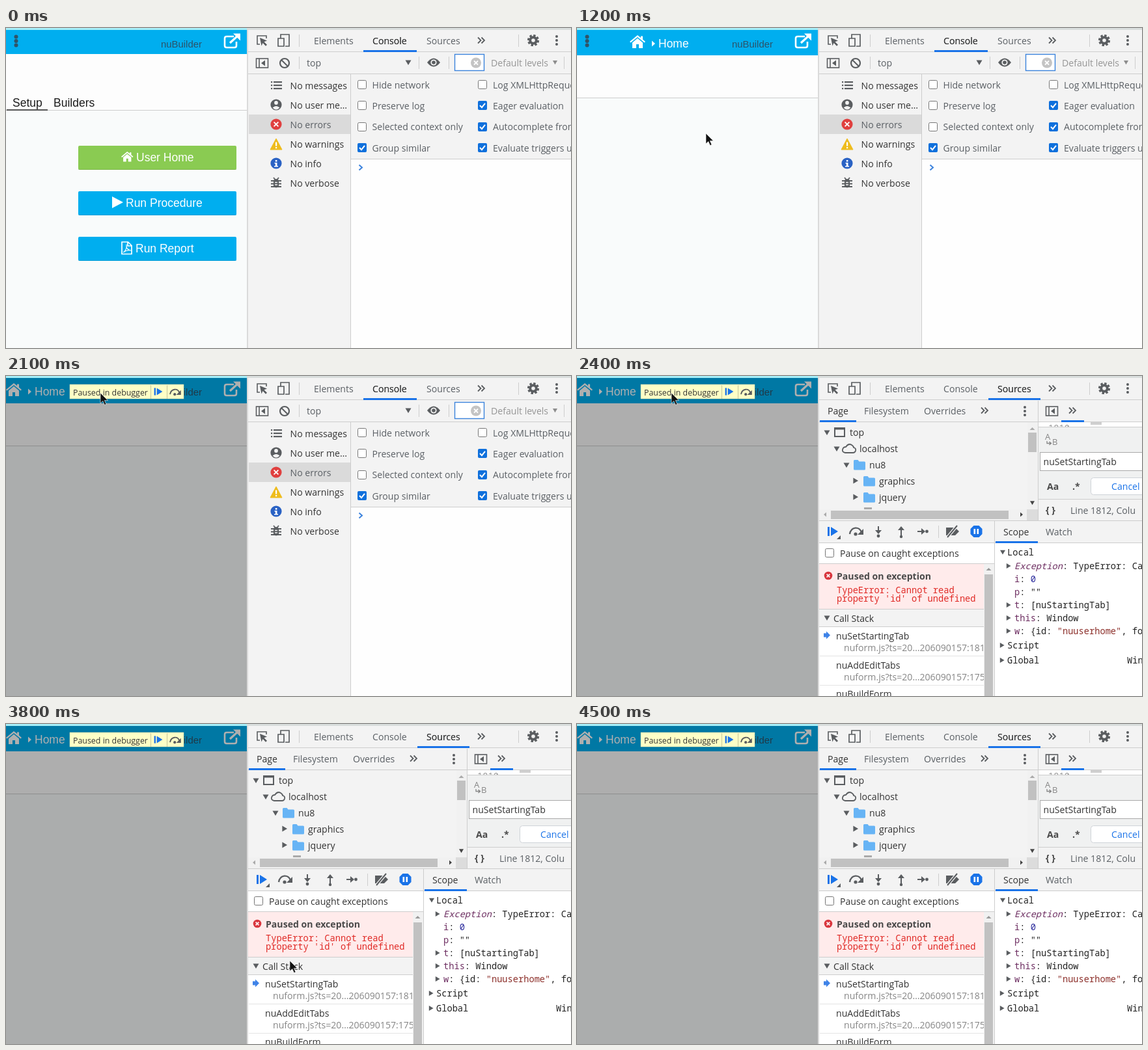
Write an HTML page that moves like this. It is 868 by 492 pixels and loops after 4.8 s.

```html
<!DOCTYPE html>
<html lang="en">
<head>
<meta charset="utf-8">
<title>Debugger walkthrough</title>
<style>
html, body { margin: 0; width: 100%; height: 100%; overflow: hidden; background: #fff; }
svg { display: block; width: 868px; height: 492px; }
text { font: 14.1px "Open Sans", sans-serif; fill: #333; white-space: pre; }
text.page { font: 17.5px "Liberation Sans", Arial, sans-serif; fill: #fff; }
text.tab { fill: #1c1c1c; }
text.app { font: 14.9px "Liberation Sans", Arial, sans-serif; fill: #2d5368; }
text.dim { fill: #5a5f64; }
text.mute { fill: #858585; }
text.bold { font-weight: 700; fill: #4a4a4a; }
text.tip { font-size: 12.4px; }
text.mono { font: 13.7px "Noto Sans Mono", monospace; fill: #222; }
text.err { fill: #e02a26; }
.key { fill: #6e2f62; }
.num { fill: #2a2a9c; }
.str { fill: #8c2f2a; }
</style>
</head>
<body>
<svg id="stage" viewBox="0 0 868 492" xmlns="http://www.w3.org/2000/svg"></svg>
<script>
const LOOP = 4800, STEP = 100;
const INK = '#5a5d60', BLUE = '#1a73e8', BAR = '#00aeef', PANEL = '#f3f3f3', LINE = '#cdcdcd';

const rect = (x, y, w, h, fill, more = '') =>
  `<rect x="${x}" y="${y}" width="${w}" height="${h}" fill="${fill}" ${more}/>`;
const text = (x, y, s, cls = '', more = '') => `<text x="${x}" y="${y}" class="${cls}" ${more}>${s}</text>`;
const path = (d, fill = INK, more = '') => `<path d="${d}" fill="${fill}" ${more}/>`;
const line = (d, color = INK, w = 2, more = '') =>
  `<path d="${d}" fill="none" stroke="${color}" stroke-width="${w}" ${more}/>`;
const dot = (x, y, r, fill = INK, more = '') => `<circle cx="${x}" cy="${y}" r="${r}" fill="${fill}" ${more}/>`;
const ring = (x, y, r, color, w, more = '') => dot(x, y, r, 'none', `stroke="${color}" stroke-width="${w}" ${more}`);
const at = (x, y, body, k = 1) => `<g transform="translate(${x} ${y}) scale(${k})">${body}</g>`;
const group = (id, body) => `<g id="${id}" display="none">${body}</g>`;
const hline = (x, y, w, c = LINE) => rect(x, y, w, 1, c);
const vline = (x, y, h, c = LINE) => rect(x, y, 1, h, c);

const kebab = (x, y, r = 2, gap = 6, c = INK) => [-1, 0, 1].map(i => dot(x, y + i * gap, r, c)).join('');
const more = (x, y) => line(`M${x - 5} ${y - 4.5}l4.5 4.5l-4.5 4.5M${x + 0.5} ${y - 4.5}l4.5 4.5l-4.5 4.5`, INK, 1.8);
const down = (x, y, r = 4.5, c = INK) => path(`M${x - r} ${y - r * .8}h${2 * r}l${-r} ${r * 1.7}z`, c);
const up = (x, y, r = 4, c = INK) => path(`M${x - r} ${y + r / 2}h${2 * r}l${-r} ${-r}z`, c);
const right = (x, y, r = 4.5, c = INK) => path(`M${x - r * .8} ${y - r}v${2 * r}l${r * 1.7} ${-r}z`, c);
const cross = (x, y, r, w) => line(`M${x - r} ${y - r}l${2 * r} ${2 * r}m0 ${-2 * r}l${-2 * r} ${2 * r}`, '#fff', w);
const house = (x, y, k = 1) => at(x, y, path(
  'M12 0L0 10l1.5 1.6L12 3l10.5 8.6L24 10l-4-3.4V1.5h-3v2.4zM12 4.8L4 11.5V20h6v-6h4v6h6v-8.5z', '#fff'), k);
const check = (x, y, on) => on
  ? rect(x, y, 14, 14, '#0f70dc', 'rx="2"') + line(`M${x + 3} ${y + 7}l3 3.2l5-6.4`, '#fff', 2)
  : rect(x + .5, y + .5, 13, 13, '#fff', 'rx="2" stroke="#767676"');
const resume = (x, y, k = 1) => at(x, y, rect(-8, -7, 3, 14, BLUE) + path('M-3-7v14l11-7z', BLUE), k);
const stepOver = (x, y, k = 1) => at(x, y,
  line('M-10 4C-8-8 5-8 8 1', INK, 2.4) + path('M11-4v9H2z') + dot(-1, 4, 2.6), k);

// Web page on the left
const exportIcon = line('M350 13h-11q-3 0-3 3v11q0 3 3 3h12q3 0 3-3v-6', '#fff', 2.6) +
  line('M344 23L357 11', '#fff', 3.2) + path('M349 8.5h11v11z', '#fff');
const bar = h => rect(0, 3, 370, h, BAR) + text(238, 30, 'nuBuilder', 'app') + exportIcon;
const crumb = x => house(x, 11) + path(`M${x + 34} 19.5v9l5-4.5z`, '#fff') + text(x + 44, 30, 'Home', 'page');
const button = (y, fill, x, label) =>
  rect(111, y, 243, 37, fill, 'rx="2"') + rect(111, y + 36, 243, 1, '#000', 'opacity=".1"') +
  text(x, y + 24, label, 'page');
const blank = top => rect(0, 0, 371, 492, '#fdfdfd') + rect(0, top, 370, 492 - top, '#f9fbfb') + hline(0, top, 370);
const dots = kebab(15.5, 20, 3, 6.6, '#2f5468');

const setup = group('setup', blank(126) + bar(37) + dots +
  text(10, 121, 'Setup', 'page tab') + text(73, 121, 'Builders', 'page tab') + rect(1, 125, 63, 2, '#555') +
  button(181, '#8acb52', 200, 'User Home') + house(177, 190, .77) +
  button(251, BAR, 184, 'Run Procedure') + path('M163 259v18l17-9z', '#fff') +
  button(321, BAR, 199, 'Run Report') +
  line('M178 329h9.5l5.5 5.5v13h-15zM187 329v6h6', '#fff', 1.7) +
  line('M180 345c4-2 6-8 5-11c-1 4 3 8 7 8c-4-1-8 0-12 3', '#fff', 1.2));

const home = group('home', blank(107) + bar(39) + dots + crumb(81));

const tooltip = rect(98, 13, 175, 22, '#ffffc6', 'stroke="#d6d6a6" stroke-width=".5"') +
  text(103, 30, 'Paused in debugger', 'tip') + vline(222, 14, 21, '#c5c59c') + vline(247, 14, 21, '#c5c59c') +
  resume(234, 24, .8) + stepOver(260, 25, .8);
const paused = group('paused', blank(107) + bar(39) + crumb(0) +
  rect(0, 3, 370, 489, '#000', 'opacity=".315"') + tooltip);

// Developer tools frame
const gear = ring(810, 19, 4.8, INK, 4) + ring(810, 19, 7.6, INK, 3, 'stroke-dasharray="3.4 2.57"');
const sideToggle = (x, y) => rect(x - 8.5, y - 7, 18, 14, 'none', `stroke="${INK}" stroke-width="1.6"`) +
  line(`M${x - 4} ${y - 7}v14`, INK, 1.6) + path(`M${x + 5} ${y - 4.5}v9l-6-4.5z`);
const tools = rect(371, 0, 497, 492, PANEL) + rect(370, 3, 2, 489, '#dadada') +
  rect(0, 0, 370, 3, '#a5eef8') + rect(370, 0, 498, 3, '#d9dddc') +
  line('M390 25h-4V12h14v4', INK, 1.6) + path('M390 15l11 4.5l-4.5 1.7l4.5 4.6l-2 2l-4.5-4.7l-2 4.3z') +
  line('M422 16V10h13v18h-6', INK, 1.7) + line('M418 16h9v12h-9z', INK, 1.7) +
  vline(450, 10, 19) + text(473, 25, 'Elements', 'dim') + text(563, 25, 'Console', 'dim') +
  text(646, 25, 'Sources', 'dim') + more(730, 19) + vline(787, 10, 19) + gear + kebab(846, 19) + hline(372, 36, 496);

// Console panel
const side = ['No messages', 'No user me…', 'No errors', 'No warnings', 'No info', 'No verbose'];
const bug = path('M411 234q4-4 8 0v9q-4 5-8 0z') +
  line('M407 235h16M407 239.500h16M407 244h16M411 230l2.500 3M419 230l-2.500 3', INK, 1.8) +
  line('M413 237.500h4M413 241h4', PANEL, 1.4);
const options = [['Hide network', 'Log XMLHttpRequests', 0, 0], ['Preserve log', 'Eager evaluation', 0, 1],
  ['Selected context only', 'Autocomplete from history', 0, 1],
  ['Group similar', 'Evaluate triggers user activation', 1, 1]];
const consolePane = group('console',
  rect(549, 34, 82, 3, BLUE) + text(563, 25, 'Console') +
  sideToggle(393, 54) + ring(428, 54, 7, INK, 2.2) + line('M423 49l10 10') + vline(450, 44, 19) +
  text(462, 59, 'top', 'dim') + down(618, 53) + vline(634, 44, 19) +
  path('M647 53q10-13 20 0q-10 13-20 0z') + dot(657, 53, 4.6, PANEL) + dot(657, 53, 2.8) +
  vline(680, 44, 19) + rect(689.5, 40.5, 45, 25, '#fff', 'stroke="#3b83dc" stroke-width="1.4"') +
  dot(722, 53.5, 8, '#c4c4c4') + cross(722, 53.5, 3, 1.8) + text(745, 59, 'Default levels', 'mute', 'opacity=".85"') +
  down(843.5, 53, 3.6, '#8d8d8d') + vline(857, 44, 19) + hline(372, 70, 496) +
  rect(373, 133, 156, 30, '#dadada') + side.map((s, i) => text(436.5, 94 + i * 30, s, i == 2 ? 'dim' : '')).join('') +
  [83, 88, 93].map(y => rect(407, y - 1, 2.2, 2.2, INK) + rect(411, y - 1, 13, 2.2, INK)).join('') +
  dot(415, 118, 8.6) + dot(415, 115, 2.9, PANEL) + path('M409.500 122.500q5.500-5 11 0q-5.500 6-11 0z', PANEL) +
  dot(415, 148, 8.6, '#e0403f') + cross(415, 148, 3.4, 1.8) +
  path('M415 170l9 17h-18z', '#eebc1d', 'stroke="#eebc1d" stroke-linejoin="round"') +
  rect(414, 175.5, 2.2, 6, '#fff') + rect(414, 183, 2.2, 2.2, '#fff') +
  dot(415, 208, 8.6, '#2a62c4') + rect(413.8, 203, 2.6, 2.6, '#fff') + path('M412.500 207h4v5h1.500v1.500h-6v-1.500h1.800v-3.500h-1.300z', '#fff') +
  bug + vline(529, 71, 421) +
  options.map(([a, b, p, q], i) => {
    const y = 80 + i * 32.4;
    return check(540, Math.round(y), p) + text(562.5, y + 12.5, a, 'dim') +
      check(725, Math.round(y), q) + text(748, y + 12.5, b, 'dim');
  }).join('') +
  rect(530, 201, 338, 291, '#fefefe') + hline(530, 201, 338) + line('M542.500 210.500l4.500 4l-4.500 4', '#3c83dd', 2));

// Sources panel
const folder = (x, y) => at(x, y, path('M0 1.500q0-1.500 1.500-1.500h5l2 2.500h8q1.500 0 1.500 1.500v10q0 1.500-1.500 1.500h-15q-1.500 0-1.500-1.500z', '#67b4f5'));
const tree = rect(372, 71, 336, 151, PANEL) +
  down(384, 87) + line('M396 80h15v13h-15zM396 81.500h15', INK, 2) + text(419, 92, 'top') +
  down(399, 112) + line('M412 118q-5-1-4-5t5-4q4-6 9-3q3 2 3 4q4 1 3 5q-1 3-4 3z', INK, 1.8) + text(434, 117, 'localhost') +
  down(414, 137) + folder(425, 129) + text(449, 142, 'nu8') +
  right(428, 161) + folder(440, 154) + text(464, 167, 'graphics') +
  right(428, 186) + folder(440, 179) + text(464, 192, 'jquery') + rect(441, 202, 12, 4, '#aaa') +
  rect(692, 71, 16, 134, '#f1f1f1') + rect(693, 87, 13, 30, '#c1c1c1') + up(699.5, 81, 4, '#aaa') + down(699.5, 195, 3.5, '#444') +
  rect(372, 205, 320, 17, '#f1f1f1') + rect(390, 207, 273, 13, '#c1c1c1') + rect(691, 205, 17, 17, '#dcdcdc') +
  path('M383 209.500v7l-4-3.500z', '#aaa') + path('M681 209.500v7l4-3.500z', '#444');
const editor = rect(709, 71, 159, 10, '#fff') + text(724, 85, '1810', 'mono', 'style="fill:#999"') +
  rect(789, 71, 17, 4, '#cfcfcf') + rect(709, 78, 159, 111, '#f0f1f1') + hline(709, 78, 159) +
  text(719, 98, 'A', 'mute', 'style="font-size:13px"') + text(730, 106, 'B', 'mute', 'style="font-size:13px"') +
  line('M722 100v3.500h6M725.500 101l3 2.500l-3 2.500', '#858585', 1.3) +
  rect(711.5, 117.5, 160, 28, '#fff', 'stroke="#a9a9a9"') + text(716.5, 137, 'nuSetStartingTab') +
  text(722, 175, 'Aa', 'bold') + text(761, 175, '.*', 'bold') +
  rect(789.5, 156.5, 90, 26, '#fff', 'rx="4" stroke="#cfd3d8"') + text(821, 175, 'Cancel', '', 'style="fill:#1a73e8"') +
  hline(709, 189, 159) + text(720, 211, '{ }', 'bold') + text(758, 212, 'Line 1812, Colu', 'dim');
const arrowDown = line('M463 231v8') + path('M458 237h10l-5 6z') + dot(463, 246, 2.4);
const arrowUp = line('M498 236v9') + path('M493 237h10l-5-6z') + dot(498, 247, 2.2);
const arrowStep = line('M523 239h7') + path('M529 234v10l6-5z') + dot(537.5, 239, 2.4);
const controls = resume(393, 239) + path('M405 245v6h-6z') + stepOver(429, 239) + arrowDown + arrowUp +
  arrowStep + vline(555, 230, 19) +
  path('M567 233h14l6 6l-6 6h-14z') + line('M569 248l15-18', PANEL, 4.5) + line('M569 248l15-18', INK, 2) +
  path('M609.500 230h8l5 5v8l-5 5h-8l-5-5v-8z', BLUE) + rect(609.5, 235, 2.6, 8, '#fff') + rect(614.5, 235, 2.6, 8, '#fff');
const call = (y, name, num) => text(398, y + 19, name) + text(410, y + 37, 'nuform.js?ts=20…206090157:' + num, 'mute') + hline(373, y + 44, 252, '#e4e4e4');
const stack = rect(372, 257, 269, 235, '#fff') + check(381, 265, 0) + text(404, 278, 'Pause on caught exceptions') +
  hline(372, 288, 269) + rect(372, 289, 253, 69, '#ffebeb') + dot(386, 307, 6.3, '#d9363e') + cross(386, 307, 2.4, 1.6) +
  text(399, 313, 'Paused on exception', 'bold') + text(399, 334, 'TypeError: Cannot read', 'mono err') +
  text(399, 347, "property 'id' of undefined", 'mono err') +
  rect(372, 358, 253, 28, PANEL) + hline(372, 358, 253) + hline(372, 385, 253) + down(384, 372) + text(394, 378, 'Call Stack') +
  '<rect id="hover" x="373" width="252" height="44" fill="#efefef"/>' +
  path('M379 395.500h4v-3l6 6l-6 6v-3h-4z', '#3f83e8') +
  call(386, 'nuSetStartingTab', '1812') + call(431, 'nuAddEditTabs', '1751') + text(398, 494, 'nuBuildForm') +
  rect(625, 289, 16, 203, '#f1f1f1') + rect(626, 305, 13, 187, '#c1c1c1') + up(632.5, 297, 4, '#999');
const key = (k, v) => `<tspan class="key">${k}</tspan>: ${v}`;
const rows = [
  [297, 1, key('<tspan font-style="italic">Exception</tspan>', 'TypeError: Cannot')],
  [317, 0, key('i', '<tspan class="num">0</tspan>')],
  [337, 0, key('p', '""')],
  [357, 1, key('t', '[nuStartingTab]')],
  [377, 1, key('this', 'Window')],
  [397, 1, key('w', '{id: <tspan class="str">"nuuserhome"</tspan>, form')]
];
const scope = rect(642, 257, 226, 235, '#fff') + hline(642, 256, 226) + text(655, 245, 'Scope') + text(720, 245, 'Watch', 'dim') +
  rect(643, 254, 65, 3, BLUE) + down(654, 271, 4) + text(661, 276, 'Local', 'mono') +
  rows.map(([y, open, s]) => (open ? right(663, y - 5, 4) : '') + text(672, y, s, 'mono')).join('') +
  right(653, 414, 4) + text(661, 419, 'Script', 'mono') +
  right(653, 437, 4) + text(661, 442, 'Global', 'mono') + text(845, 442, 'Window', 'mono');
const sources = group('sources', rect(632, 34, 80, 3, BLUE) + text(646, 25, 'Sources') +
  tree + editor + text(385, 59, 'Page') + text(441, 59, 'Filesystem', 'dim') + text(533, 59, 'Overrides', 'dim') +
  more(626, 53) + kebab(688, 54) + sideToggle(729, 54) + more(761, 53) + hline(372, 70, 496) +
  rect(373, 68, 56, 3, BLUE) + rect(744, 68, 35, 3, BLUE) + vline(708, 38, 184) + hline(372, 222, 496) +
  controls + hline(372, 256, 269) + stack + scope + vline(641, 223, 269));

const pointer = group('arrow', path('M0 0V16L3.800 12.500L6.500 18.500L9 17.400L6.400 11.600H11.500Z', '#111', 'stroke="#fff" stroke-width=".6"'));
const beamShape = 'M-4-8.500h3l1 1l1-1h3M0-7.500v15M-4 8.500h3l1-1l1 1h3';
const beam = group('beam', line(beamShape, '#fff', 3.4) + line(beamShape, '#111', 1.3));

const stage = document.getElementById('stage');
stage.innerHTML = setup + home + paused + tools + consolePane + sources + pointer + beam;
const el = id => document.getElementById(id);
const show = (id, on) => el(id).setAttribute('display', on ? 'inline' : 'none');

// Pointer stops: time, x, y
const stops = [[100, 290, 244], [300, 211, 196], [1000, 211, 196], [1700, 143, 24], [2000, 143, 24],
  [2100, 145, 26], [3300, 145, 26], [3400, 149, 41], [4000, 536, 477], [4100, 575, 520]];
const ease = u => u * u * (3 - 2 * u);

function pointerAt(t) {
  const i = stops.findIndex(s => s[0] > t);
  if (i < 1) return [-50, 600];
  const [t0, x0, y0] = stops[i - 1], [t1, x1, y1] = stops[i];
  const u = ease((t - t0) / (t1 - t0));
  return [x0 + (x1 - x0) * u, y0 + (y1 - y0) * u];
}

function draw(ms) {
  const t = Math.floor(ms / STEP) * STEP;
  show('setup', t < 400);
  show('home', t >= 400 && t < 2100);
  show('paused', t >= 2100);
  show('console', t < 2200);
  show('sources', t >= 2200);
  const [x, y] = pointerAt(t);
  const typing = t < 2100 && y < 34;
  for (const id of ['arrow', 'beam']) {
    show(id, typing === (id === 'beam'));
    el(id).setAttribute('transform', `translate(${Math.round(x)} ${Math.round(y)})`);
  }
  const row = Math.floor((y - 386) / 45);
  el('hover').setAttribute('y', 386 + row * 45);
  show('hover', row >= 0 && x > 372 && x < 625);
}

const start = performance.now();
function tick() {
  draw((performance.now() - start) % LOOP);
  requestAnimationFrame(tick);
}
tick();
</script>
</body>
</html>
```
